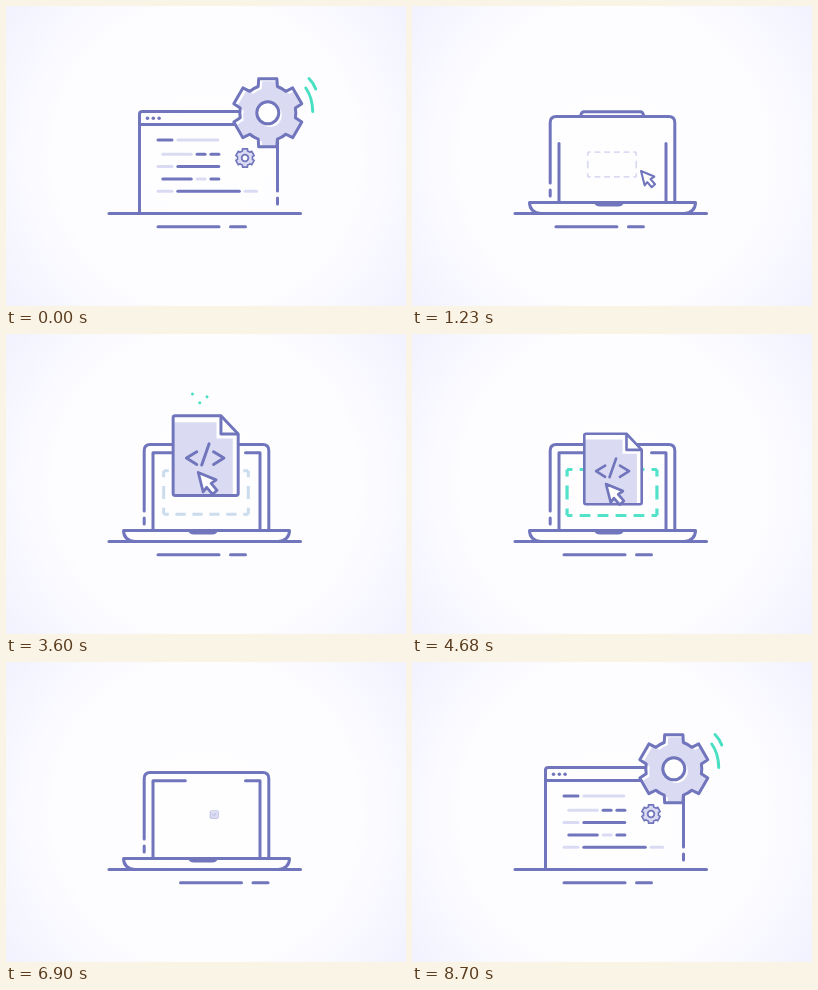
These frames come from a looping animation (400 by 300 pixels, 8730 ms). An HTML page:

```html
<!DOCTYPE html>
<html lang="en">
<head>
<meta charset="utf-8">
<title>Build loop</title>
<style>
html, body { margin: 0; width: 100%; height: 100%; overflow: hidden; background: #fdfdff; }
svg { display: block; width: 100vw; height: 100vh; }
</style>
</head>
<body>
<svg id="stage" viewBox="0 0 400 300">
  <defs>
    <radialGradient id="glow" gradientUnits="userSpaceOnUse" cx="200" cy="150" r="250">
      <stop offset="0" stop-color="#fefeff"/>
      <stop offset=".6" stop-color="#fdfdff"/>
      <stop offset="1" stop-color="#f2f2ff"/>
    </radialGradient>
    <clipPath id="gearClip"><path id="gearShape"/></clipPath>
  </defs>
  <rect width="400" height="300" fill="url(#glow)"/>
</svg>
<script>
const LOOP = 8730;
const DARK = '#7075bc', LIGHT = '#dadbf2', GREEN = '#48dfc3', WHITE = '#fefeff';
const stage = document.getElementById('stage');

// --- Building blocks ---
function add(tag, attrs, parent = stage) {
  const el = document.createElementNS('http://www.w3.org/2000/svg', tag);
  for (const name in attrs) el.setAttribute(name, attrs[name]);
  parent.appendChild(el);
  return el;
}
const group = () => add('g', {});
const line = (d, parent, stroke = DARK, width = 3) => add('path', {
  d, stroke, fill: 'none', 'stroke-width': width,
  'stroke-linecap': 'round', 'stroke-linejoin': 'round'
}, parent);
const shape = (d, fill, parent) => add('path', { d, fill }, parent);
const circle = (cx, cy, r, parent, fill, stroke = 'none', width = 0) =>
  add('circle', { cx, cy, r, fill, stroke, 'stroke-width': width }, parent);

// --- Timing ---
const mix = (a, b, p) => a + (b - a) * p;
const smooth = p => p < .5 ? 4 * p ** 3 : 1 - (2 - 2 * p) ** 3 / 2;
const pop = p => smooth(p) + .8 * p * p * (1 - p);
const ramp = (t, at, dur) => Math.min(1, Math.max(0, (t - at) / dur));
const step = (t, at, dur = 500) => smooth(ramp(t, at, dur));
const bump = (t, from, to) => Math.sin(Math.PI * ramp(t, from, to - from)) ** 2;

// Presence 0..1 of a part that enters at `on` and leaves at `off`;
// with on > off it stays across the loop seam.
const life = (t, on, off, dur = 500, ease = smooth) =>
  ease(ramp(t, on, dur) - ramp(t, off, dur) + (on > off ? 1 : 0));

// --- Drawing state ---
const show = (el, on) => el.setAttribute('display', on ? 'inline' : 'none');

function trim(el, a, b) {
  show(el, b - a > .002);
  const len = el.getTotalLength();
  el.setAttribute('stroke-dasharray', `${(b - a) * len + .01} 999`);
  el.setAttribute('stroke-dashoffset', -a * len);
}
function place(el, x, y, scale = 1, turn = 0) {
  show(el, scale > .01);
  el.setAttribute('transform', `translate(${x} ${y}) rotate(${turn}) scale(${scale})`);
}
// Grow a part while it travels between two points.
const fly = (el, [x0, y0], [x1, y1], p, size = 1, turn = 0) =>
  place(el, mix(x0, x1, p), mix(y0, y1, p), p * size, turn);

function gearPath(teeth, inner, outer) {
  const pt = (r, deg) => {
    const a = deg * Math.PI / 180;
    return `${(r * Math.cos(a)).toFixed(2)} ${(r * Math.sin(a)).toFixed(2)}`;
  };
  let d = '';
  for (let i = 0; i < teeth; i++) {
    const a = i * 360 / teeth - 90;
    d += `${i ? `A${inner} ${inner} 0 0 1 ` : 'M'}${pt(inner, a - 20)}` +
         `L${pt(outer, a - 15)}L${pt(outer, a + 15)}L${pt(inner, a + 20)}`;
  }
  return `${d}A${inner} ${inner} 0 0 1 ${pt(inner, -110)}Z`;
}
const gearD = gearPath(6, 28, 35.2);
document.getElementById('gearShape').setAttribute('d', gearD);

// --- Ground ---
line('M103 207.5H294.5');
const unders = ['M152 220.7H213', 'M224.5 220.7H239.5'].map(d => line(d));
const streak = line('M107.3 -12V12');

// --- Browser window ---
const browser = group();
const frame = line('M133.5 205.5V108Q133.5 105.5 136.5 105.5H268Q271.5 105.5 271.5 109V185', browser);
const frameDash = line('M271.5 192V198', browser);
const header = line('M134 118.5H270', browser);
const dots = [0, 1, 2].map(i => circle(141.5 + 5.8 * i, 112.3, 1.75, browser, DARK));

// Code rows: y, then word widths; negative widths are pale.
const rows = [
  [134, 14, -40], [148.3, -28.5, 8, 8], [160.5, -14, 41], [173, 28.5, -8, 8], [185.3, -14, 61.5, -11.5]
].flatMap(([y, ...words], i) => {
  let x = 152 + i % 2 * 4.8;
  return words.map(w => {
    const el = line(`M${x} ${y}h${Math.abs(w)}`, browser, w > 0 ? DARK : LIGHT);
    x += Math.abs(w) + 5.8;
    return el;
  });
});
const cog = add('g', {}, browser);
add('path', { d: gearD, transform: 'scale(.27)', fill: LIGHT, stroke: DARK, 'stroke-width': 6, 'stroke-linejoin': 'round' }, cog);
circle(0, 0, 3.3, cog, WHITE, DARK, 1.8);

// --- Laptop, drawn as two halves ---
const laptop = group();
const mirror = add('g', { transform: 'translate(401 0) scale(-1 1)' }, laptop);
const halves = [laptop, mirror];
const bases = halves.map(g => line('M200.5 196.5H117.5C117.5 203 122 207.5 129 207.5', g));
const lidD = y => `M138.2 ${y}V116.5Q138.2 110.5 144.2 110.5H200.5`;
const lids = halves.map(g => line(lidD(196), g));
const lidDash = line('M138.2 184V190', laptop);
const sideDash = line('', laptop);
const inners = [223.5, 161.5].map((x, i) => line(`M147 196V118.7H${x}`, halves[i]));
const hump = line('M168.5 0Q169.5 -4.3 172 -4.3H228.5Q231 -4.3 231.7 0', laptop);
const notch = shape('M-15 196H15Q14 200.5 9 200.5H-9Q-14 200.5 -15 196Z', DARK, laptop);

// --- Drop zone: long and short sides with dashes meeting at the corners ---
const zone = group();
const dashed = (d, len, count) => {
  const gap = len / count;
  add('path', {
    d, fill: 'none', 'stroke-width': 3,
    'stroke-dasharray': `${gap * .6} ${gap * .4}`, 'stroke-dashoffset': gap * .3
  }, zone);
};
for (const s of [-1, 1]) {
  dashed(`M-42 ${s * 21.5}h84`, 84, 5);
  dashed(`M${s * 42} -21.5v43`, 43, 2);
}

// --- Speech bubble ---
const bubble = group();
shape('M-13 -12.5L13 -13.5Q16 -13.5 16 -10.5V8Q16 11 13 11H10L7 15.5L3 11H-13Q-16 11 -16 8V-9.5Q-16 -12.5 -13 -12.5Z', LIGHT, bubble);
circle(7.5, 23.5, 2.6, bubble, LIGHT);

// --- Code file ---
const file = group();
const sheet = 'M-31 -40.5H15.5L33 -22V38.5Q33 40.5 31 40.5H-31Q-33 40.5 -33 38.5V-38.5Q-33 -40.5 -31 -40.5Z';
shape(sheet, WHITE, file);
shape('M-33 -34H11V-17.5H27.5V40H-33Z', LIGHT, file);
shape('M15.5 -40.5V-22H33Z', WHITE, file);
line(sheet, file);
line('M15.5 -40V-22H32.5', file);
line('M-9 -4L-19.5 2.5L-9 9M8 -4L18.5 2.5L8 9M3.5 -12L-4 9.5', file);

// --- Card with check ---
const card = group();
const frameBox = { x: -31.5, y: -29.5, width: 63, height: 59, rx: 8 };
add('rect', { ...frameBox, fill: WHITE }, card);
add('rect', { x: -31, y: -24, width: 57.5, height: 53, rx: 6, fill: LIGHT }, card);
add('rect', { ...frameBox, fill: 'none', stroke: DARK, 'stroke-width': 3 }, card);
const check = line('M-9.5 1L-3 7.5L10 -5.5', card);

// --- Cursor ---
const cursor = group();
line('M0 0L18 7.5L13 11L19 18L14.5 22L8.5 15L5 19.5Z', cursor, DARK, 2.8).setAttribute('fill', WHITE);

// --- Big gear ---
const gear = group();
shape(gearD, WHITE, gear);
const tint = add('g', { 'clip-path': 'url(#gearClip)' }, gear);
shape(gearD, LIGHT, tint).setAttribute('transform', 'translate(3.5 2.5)');
circle(2.5, 2.5, 11.5, gear, WHITE);
line(gearD, gear);
circle(0, 0, 11, gear, WHITE, DARK, 3);

// --- Green accents ---
const accents = list => list.map(d => line(d, stage, GREEN));
const arcs = accents(['M303 72.5Q307.5 77 309.7 83', 'M299.8 82Q306.5 91.5 306.7 105.5']);
const bars = accents([60, 68.7, 62.7].map((y, i) => `M${186.5 + 7.25 * i} 73V${y}`));
const rays = accents(['M295.3 78V69.5', 'M301.7 81.7L308 75.5', 'M304.3 89.4H313.5']);

// Draw accents outward, later remove them in the same direction.
function burst(list, t, on, off) {
  const seam = on > off;
  list.forEach((el, i) => trim(el,
    seam && t >= on ? 0 : step(t, off, 200),
    seam && t < on ? 1 : step(t, on + i * 25, 250)));
}

function drawGround(t) {
  const swing = -28 * bump(t, 500, 1392);
  unders.forEach((el, i) => place(el, swing + 22.5 * life(t, 4690, 7048 + 45 * i, 700), 0));
  const p = ramp(t, 7330, 340);
  place(streak, 0, mix(180, 46, p));
  trim(streak, .5 - Math.sin(Math.PI * p) / 2, .5 + Math.sin(Math.PI * p) / 2);
}

function drawBrowser(t, turn) {
  const edge = life(t, 7255, 450), words = life(t, 7337, 330);
  place(browser, 0, -3.7 * bump(t, 7250, 7750));
  trim(frame, 0, edge);
  show(frameDash, edge === 1);
  trim(header, 0, life(t, 7351, 400));
  dots.forEach((dot, i) => dot.setAttribute('r', 1.75 * life(t, 7600 + 50 * i, 400 + 40 * i, 180)));
  rows.forEach(el => trim(el, 0, words));
  place(cog, 239, 152, life(t, 7620, 300, 400, pop), -turn);
}

function drawLaptop(t) {
  const base = life(t, 760, 7000, 420), lid = life(t, 780, 6850, 440);
  const reach = 155 * life(t, 958, 6650, 600);
  const gap = life(t, 4800, 6400);
  [mix(177, 196, gap), gap ? mix(150, 143, gap) : 196].forEach((y, i) => {
    lids[i].setAttribute('d', lidD(y));
    trim(lids[i], 0, lid);
    trim(bases[i], 0, base);
    trim(inners[i], 0, Math.min(1, reach / inners[i].getTotalLength()));
  });
  show(lidDash, lid > 0 && gap < .95);
  show(sideDash, gap > 0);
  sideDash.setAttribute('d', `M262.8 196V${mix(165, 170, gap)}M262.8 ${mix(165, 161, gap)}V${mix(150, 154, gap)}`);

  const rise = bump(t, 1020, 1440);
  show(hump, rise > .02);
  hump.setAttribute('transform', `translate(0 110) scale(1 ${rise})`);
  notch.setAttribute('transform', `translate(197 0) scale(${life(t, 900, 7000, 350)} 1)`);
}

function drawFile(t) {
  const lift = step(t, 1260), hover = step(t, 2730, 450), drag = step(t, 3450);
  place(zone, 200, 158.5, life(t, 1034, 4690, 400, pop) * (1 + .07 * drag));
  zone.setAttribute('stroke', `rgb(${mix(218, 82, drag)} ${mix(219, 225, drag)} ${mix(242, 201, drag)})`);
  fly(file, [200, 158], [199.5 + 1.5 * drag, 120 + 15 * drag],
    life(t, 1430, 4690, 500, pop), 1 - .13 * drag);
  place(cursor, 229 - 3 * lift - 34 * hover + 2 * drag, 165 - 33 * lift + 5 * hover + 13 * drag,
    life(t, 1012, 4690, 400, pop) * (1 - .06 * drag));
}

function drawCard(t) {
  fly(card, [200, 158], [263.5, 116.5], life(t, 4930, 6540, 500, pop));
  trim(check, 0, step(t, 5150, 330));
  place(bubble, 201.5, 152.5, life(t, 5180, 6540, 400, pop));
}

function draw(t) {
  const turn = 180 * (step(t, 270, 600) + step(t, 7480, 1150));
  drawGround(t);
  drawBrowser(t, turn);
  drawLaptop(t);
  drawFile(t);
  drawCard(t);
  fly(gear, [262, 180], [261.8, 106.8], life(t, 7212, 270, 600, pop), 1, turn);
  burst(arcs, t, 8130, 270);
  burst(bars, t, 1780, 3420);
  burst(rays, t, 5270, 6540);
}

const start = performance.now();
function tick() {
  draw((performance.now() - start) % LOOP);
  requestAnimationFrame(tick);
}
tick();
</script>
</body>
</html>
```
